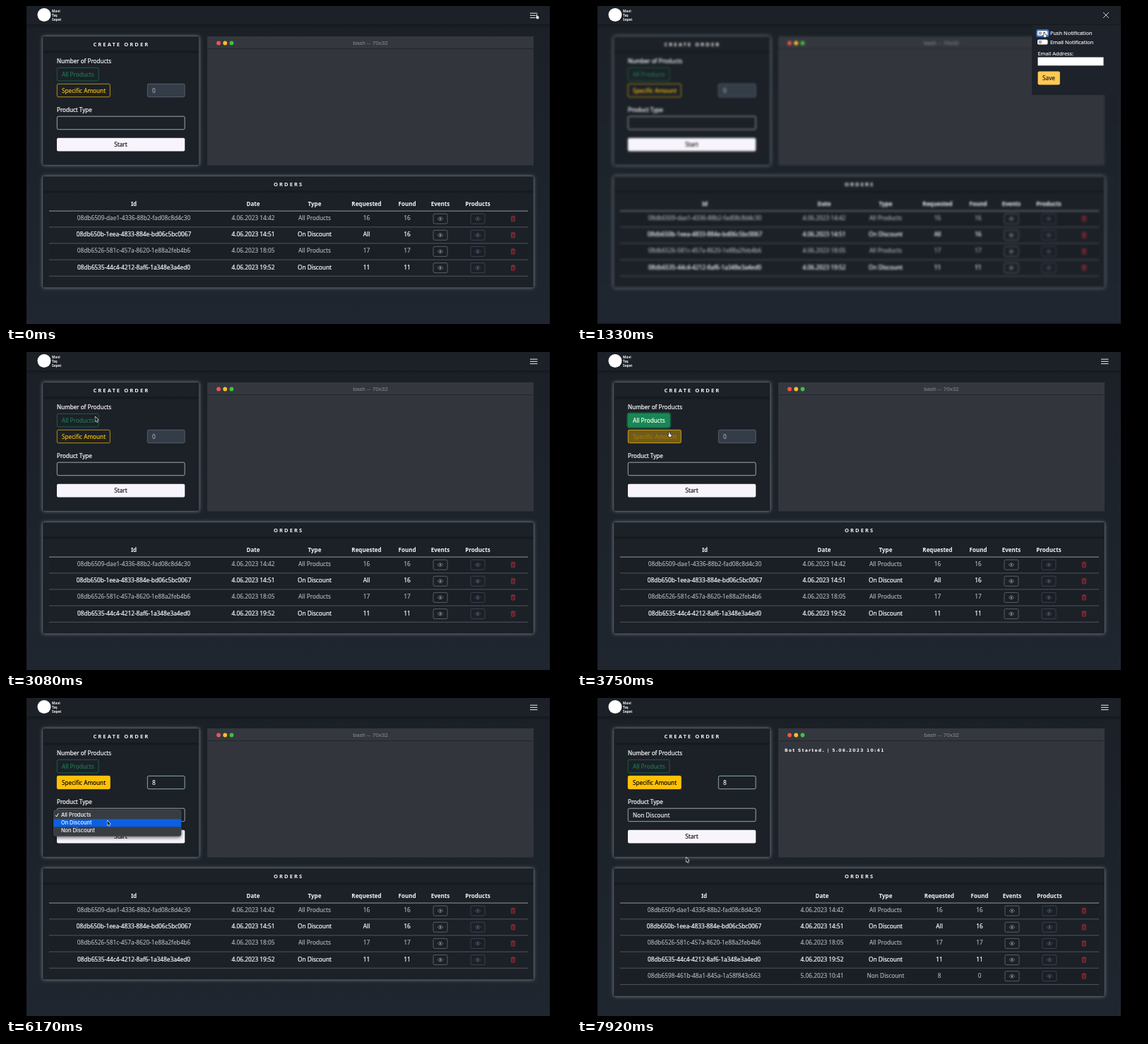
Animation, 800 px wide and 450 px high, one loop 8000 ms. Source, as an HTML page with a canvas:

```html
<!DOCTYPE html>
<html lang="en">
<head>
<meta charset="utf-8">
<title>Order dashboard</title>
<style>
html, body { margin: 0; width: 100%; height: 100%; overflow: hidden; background: #000; }
canvas { display: block; width: 800px; height: 450px; }
</style>
</head>
<body>
<canvas id="stage" width="800" height="450"></canvas>
<script>
const LOOP = 8000;
const screen2d = document.getElementById('stage').getContext('2d');
const buffer = document.createElement('canvas');
buffer.width = 800;
buffer.height = 450;
const page2d = buffer.getContext('2d');
let c = page2d;

const SANS = '"Noto Sans", sans-serif';
const SYSTEM = 'Inter, sans-serif';
const AMBER = '#ffc107', GREEN = '#198754', WHITE = '#f4f4f6';

// Moments of the interaction, in ms
const OPEN = 330, PUSH_FOCUS = 1270, PUSH_ON = 1400, SAVE = 1980, CLOSE = 2470;
const ALL_HOVER = 3120, ALL_CLICK = 3300, SPEC_HOVER = 3690, SPEC_CLICK = 3850;
const INPUT_FOCUS = 4350, SELECT_DIGIT = 4750, TYPE = 5330, LEAVE_INPUT = 5500;
const LIST_OPEN = 5950, LIST_CLOSE = 6800, ORDERED = 7720;

const PATH = [
  [0, 752, 15], [560, 752, 15], [1230, 662, 41], [1500, 662, 41],
  [1850, 668, 104], [2080, 668, 104], [2380, 752, 19], [2540, 752, 19],
  [3150, 105, 98], [3430, 105, 98], [3720, 131, 117], [3900, 131, 117],
  [4350, 214, 120], [4600, 214, 120], [4960, 177, 122], [5420, 177, 122],
  [5840, 150, 166], [6000, 148, 168], [6140, 145, 177], [6280, 145, 177],
  [6480, 143, 188], [6860, 143, 188], [7200, 158, 198], [7620, 158, 198],
  [7860, 156, 229]
];

const clamp = v => Math.max(0, Math.min(1, v));
const ease = v => v * v * (3 - 2 * v);
const fade = (t, from, ms = 150) => ease(clamp((t - from) / ms));
const within = (t, a, b) => t >= a && t < b;

function cursorAt(t) {
  const i = PATH.findIndex(p => p[0] > t);
  if (i < 0) return PATH[PATH.length - 1].slice(1);
  const [t0, x0, y0] = PATH[i - 1], [t1, x1, y1] = PATH[i];
  const k = ease((t - t0) / (t1 - t0));
  return [x0 + (x1 - x0) * k, y0 + (y1 - y0) * k];
}

function text(s, x, y, { size = 8.2, color = WHITE, weight = 500, align = 'left', family = SANS, gap = 0, bold = 0 } = {}) {
  c.font = `${weight} ${size}px ${family}`;
  c.letterSpacing = gap + 'px';
  c.textAlign = align;
  c.textBaseline = 'alphabetic';
  c.fillStyle = color;
  c.fillText(s, x, y + size * 0.36);
  if (bold) {
    c.lineJoin = 'round';
    c.lineWidth = bold;
    c.strokeStyle = color;
    c.strokeText(s, x, y + size * 0.36);
  }
}

function box(x, y, w, h, { fill, stroke, r = 2, line = 0.8 } = {}) {
  c.beginPath();
  c.roundRect(x, y, w, h, r);
  if (fill) { c.fillStyle = fill; c.fill(); }
  if (stroke) { c.strokeStyle = stroke; c.lineWidth = line; c.stroke(); }
}

function stroke(points, color, width = 1) {
  c.beginPath();
  points.forEach(([x, y]) => c.lineTo(x, y));
  c.strokeStyle = color;
  c.lineWidth = width;
  c.stroke();
}

function dot(x, y, r, color) {
  c.beginPath();
  c.arc(x, y, r, 0, Math.PI * 2);
  c.fillStyle = color;
  c.fill();
}

function card(x, y, w, h, title) {
  c.save();
  c.shadowColor = 'rgba(170,178,184,.75)';
  c.shadowBlur = 5;
  box(x, y, w, h, { fill: '#1c2128' });
  c.restore();
  box(x, y, w, h, { stroke: 'rgba(120,126,132,.3)', line: 0.6 });
  const g = c.createLinearGradient(0, y + 19, 0, y + 25);
  g.addColorStop(0, 'rgba(8,11,15,0)');
  g.addColorStop(0.45, 'rgba(8,11,15,.4)');
  g.addColorStop(1, 'rgba(8,11,15,0)');
  c.fillStyle = g;
  c.fillRect(x + 1, y + 19, w - 2, 6);
  text(title, x + w / 2 + 0.6, y + 10.9, { size: 7.5, weight: 600, align: 'center', gap: 2.1 });
}

function drawForm(t) {
  card(52, 43, 221.5, 182, 'CREATE ORDER');
  text('Number of Products', 72, 78, { size: 8.1, bold: 0.22 });

  const allOn = t < SPEC_CLICK ? fade(t, ALL_HOVER) : 1 - fade(t, SPEC_CLICK);
  if (within(t, ALL_CLICK, SPEC_CLICK)) box(71.5, 86.5, 60.5, 20.5, { stroke: 'rgba(25,135,84,.5)', line: 2.5, r: 3 });
  box(72.3, 87.4, 58.8, 18.5, { stroke: '#1b6d49' });
  c.globalAlpha = allOn;
  box(72, 87, 59.5, 19.5, { fill: GREEN });
  c.globalAlpha = 1;
  text('All Products', 79, 97.2, { color: allOn > 0.5 ? '#fff' : '#1d7a50', bold: 0.15 });

  const specOn = fade(t, SPEC_HOVER);
  box(72.3, 110.3, 75, 18.4, { stroke: '#dfaa0c' });
  c.globalAlpha = specOn;
  box(72, 110, 75.5, 19, { fill: AMBER });
  c.globalAlpha = 1;
  const k = 1 - specOn;
  text('Specific Amount', 79, 119.8, { color: `rgb(${255 * k},${193 * k},${7 * k})`, bold: 0.15 });

  drawAmount(t);
  text('Product Type', 72, 147, { size: 8.1, bold: 0.22 });
  box(72.3, 156.2, 180.8, 18.5, { stroke: '#c4c7ca' });
  if (t >= LIST_CLOSE) text('Non Discount', 79, 166, { bold: 0.15 });
  box(72, 186.7, 181.2, 18.8, { fill: '#f8f4fb' });
  text('Start', 162.5, 196.5, { color: '#15171b', align: 'center', bold: 0.2 });
  if (within(t, LIST_OPEN, LIST_CLOSE)) drawList(t);
}

function drawAmount(t) {
  const enabled = t >= SPEC_CLICK;
  const border = !enabled ? '#616a76' : t < TYPE ? '#c4c7ca' : '#add3b4';
  box(200.3, 110.3, 52.8, 18.4, { fill: enabled ? '#1c2128' : '#343c48', stroke: border });
  if (within(t, SELECT_DIGIT, TYPE)) {
    c.fillStyle = '#587cae';
    c.fillRect(206.5, 114, 5.5, 11.5);
  }
  text(t < TYPE ? '0' : '8', 207, 119.7, { color: enabled ? WHITE : '#a0a6ad', bold: 0.15 });
  if (within(t, INPUT_FOCUS, LEAVE_INPUT)) {
    box(239, 113.5, 8, 12, { fill: '#f1f1f1', r: 1 });
    c.fillStyle = '#444';
    for (const s of [-1, 1]) {
      c.beginPath();
      c.moveTo(241.2, 119.5 + s * 2);
      c.lineTo(244.8, 119.5 + s * 2);
      c.lineTo(243, 119.5 + s * 4.2);
      c.fill();
    }
  }
}

function drawList(t) {
  const active = t < 6080 ? 0 : t < 6380 ? 1 : 2;
  c.save();
  c.shadowColor = 'rgba(0,0,0,.6)';
  c.shadowBlur = 5;
  c.shadowOffsetY = 2;
  box(67.5, 158.5, 180.5, 37, { fill: '#393c41', r: 3 });
  c.restore();
  box(67.5, 158.5, 180.5, 37, { stroke: '#55585c', r: 3, line: 0.6 });
  c.fillStyle = '#0b5fe2';
  c.fillRect(67.5, 160.5 + active * 10.9, 180.5, 10.9);
  ['All Products', 'On Discount', 'Non Discount'].forEach((s, i) =>
    text(s, 78, 165.4 + i * 10.9, { size: 7.4, color: '#fff', family: SYSTEM }));
  stroke([[70, 166], [71.6, 168], [74.3, 163.3]], '#fff', 1);
}

function drawTerminal(t) {
  c.fillStyle = '#32353c';
  c.fillRect(285, 43, 462, 182.5);
  c.fillStyle = '#34383e';
  c.fillRect(285, 43, 462, 17);
  c.fillStyle = '#23272d';
  c.fillRect(285, 60, 462, 1);
  ['#f4544d', '#fbbd2e', '#3fc13f'].forEach((color, i) => dot(301 + i * 9.2, 52.5, 2.9, color));
  text('bash -- 70x32', 516, 51.9, { size: 8.1, weight: 400, color: '#8b8e92', align: 'center', family: '"Liberation Sans", sans-serif' });
  if (t >= ORDERED) text('Bot Started. | 5.06.2023 10:41', 294, 73.6, { size: 6, weight: 700, gap: 1.3, family: '"DejaVu Sans", sans-serif' });
}

function eyeButton(x, y, color, border) {
  box(x - 10, y - 7, 20, 14, { stroke: border });
  c.beginPath();
  c.moveTo(x - 3.7, y);
  c.quadraticCurveTo(x, y - 5, x + 3.7, y);
  c.quadraticCurveTo(x, y + 5, x - 3.7, y);
  c.strokeStyle = color;
  c.lineWidth = 0.7;
  c.stroke();
  dot(x, y, 1.2, color);
}

function trash(x, y) {
  const red = '#a22a36';
  stroke([[x - 3.3, y - 3], [x + 3.3, y - 3]], red, 0.9);
  stroke([[x - 1.2, y - 3.9], [x + 1.2, y - 3.9]], red, 0.8);
  box(x - 2.5, y - 2.5, 5, 6.2, { fill: 'rgba(162,42,54,.4)', stroke: red, r: 0.8 });
}

const ORDERS = [
  ['08db6509-dae1-4336-88b2-fad08c8d4c30', '4.06.2023 14:42', 'All Products', '16', '16'],
  ['08db650b-1eea-4833-884e-bd06c5bc0067', '4.06.2023 14:51', 'On Discount', 'All', '16'],
  ['08db6526-581c-457a-8620-1e88a2feb4b6', '4.06.2023 18:05', 'All Products', '17', '17'],
  ['08db6535-44c4-4212-8af6-1a348e3a4ed0', '4.06.2023 19:52', 'On Discount', '11', '11'],
  ['08db6598-461b-48a1-845a-1a58f843c663', '5.06.2023 10:41', 'Non Discount', '8', '0']
];
const HEADS = ['Id', 'Date', 'Type', 'Requested', 'Found', 'Events', 'Products'];

function drawOrders(t) {
  const more = t >= ORDERED;
  const cols = more ? [180, 347, 437, 513, 570, 616, 669] : [181, 350, 437, 510.5, 568, 615, 668];
  card(52, 241, 695, more ? 181 : 157.5, 'ORDERS');
  HEADS.forEach((s, i) => text(s, cols[i], 280.2, { weight: 600, size: 8, align: 'center' }));
  stroke([[61, 290.1], [739, 290.1]], '#a6a9ad', 0.9);
  ORDERS.slice(0, more ? 5 : 4).forEach((row, r) => {
    const y = 300 + r * 23.15;
    const dim = r % 2 === 0;
    if (dim) {
      c.fillStyle = 'rgba(0,0,0,.06)';
      c.fillRect(61, y - 10, 678, 23);
    }
    row.forEach((s, i) => text(s, cols[i], y + 0.2, {
      size: 8.27, align: 'center', color: dim ? '#b4b7bb' : WHITE, bold: dim ? 0.12 : 0.22
    }));
    eyeButton(cols[5], y + 1.1, '#92979e', '#686e76');
    eyeButton(cols[6], y + 1.1, '#566575', '#404b58');
    trash(718, y + 1.1);
    stroke([[61, y + 12.8], [739, y + 12.8]], '#5f646b', 0.8);
  });
}

function drawPage(t) {
  const g = c.createLinearGradient(0, 0, 0, 450);
  g.addColorStop(0, '#1b2027');
  g.addColorStop(1, '#1f262f');
  c.fillStyle = g;
  c.fillRect(0, 0, 800, 450);
  drawForm(t);
  drawTerminal(t);
  drawOrders(t);
}

function drawNav(open) {
  c.fillStyle = '#1c2128';
  c.fillRect(29, 0, 741, 27);
  const g = c.createLinearGradient(0, 26, 0, 32);
  g.addColorStop(0, 'rgba(6,9,13,.35)');
  g.addColorStop(1, 'rgba(6,9,13,0)');
  c.fillStyle = g;
  c.fillRect(29, 26, 741, 6);
  dot(54, 12.5, 9.5, '#fff');
  ['Mavi', 'Taş', 'Sepet'].forEach((s, i) => text(s, 65, 7 + i * 6.1, { size: 4.8, weight: 700 }));
  if (open) {
    stroke([[745, 9], [753, 17]], '#c9ccd0', 1);
    stroke([[753, 9], [745, 17]], '#c9ccd0', 1);
  } else {
    for (const y of [10.2, 13.4, 16.6]) stroke([[742, y], [752.5, y]], '#e8e8e8', 1);
  }
}

function toggle(y, on) {
  box(652, y - 3.5, 14.5, 7, { fill: on > 0.5 ? '#ffc44f' : '#fff', r: 1.8 });
  c.globalAlpha = 1 - on;
  dot(655.8 + on * 7, y, 2.5, '#a9a9ad');
  c.globalAlpha = 1;
}

function drawSettings(t) {
  c.fillStyle = '#1e222a';
  c.fillRect(644, 27, 126, 99);
  if (within(t, PUSH_FOCUS, SAVE)) box(651, 33.7, 16.5, 9.6, { stroke: '#3f86e8', line: 1.5, r: 2.5 });
  toggle(38.5, fade(t, PUSH_ON, 120));
  toggle(51, 0);
  text('Push Notification', 670, 38.4, { size: 7.4, bold: 0.15 });
  text('Email Notification', 670, 51.1, { size: 7.4, bold: 0.15 });
  text('Email Address:', 652.5, 67.1, { size: 7.35, bold: 0.15 });
  c.fillStyle = '#fff';
  c.fillRect(652.5, 72.5, 93, 11.8);
  if (t >= SAVE) box(651.7, 91.7, 33, 20.6, { stroke: '#3f86e8', line: 1.8, r: 3 });
  box(652.5, 92.5, 31.3, 19, { fill: '#ffc953' });
  text('Save', 668, 102, { color: '#15171b', align: 'center', bold: 0.15 });
}

function polygon(points, fill, edge) {
  c.beginPath();
  points.forEach(([x, y]) => c.lineTo(x, y));
  c.closePath();
  c.lineJoin = 'round';
  c.strokeStyle = edge;
  c.lineWidth = 1.2;
  c.stroke();
  c.fillStyle = fill;
  c.fill();
}

function drawCursor(t) {
  const [x, y] = cursorAt(t);
  const hand = t < 2540 || within(t, ALL_HOVER, 3950) || within(t, 7120, 7680);
  c.save();
  c.translate(x, y);
  if (hand) polygon([[-1, -3.6], [0.1, -3.6], [0.4, -1], [2.7, 0], [2.3, 3.3], [-0.6, 3.3], [-2.3, 0.6], [-1, 0.6]], '#f2f2f2', '#111');
  else polygon([[-1.5, -3.5], [-1.5, 3], [0, 1.7], [1.1, 4], [2, 3.5], [1, 1.4], [2.8, 1.2]], '#111', '#f2f2f2');
  c.restore();
}

function render(t) {
  c = page2d;
  drawPage(t);

  c = screen2d;
  c.fillStyle = '#000';
  c.fillRect(0, 0, 800, 450);
  c.save();
  c.beginPath();
  c.rect(29, 0, 741, 450);
  c.clip();
  const shown = t < CLOSE ? fade(t, OPEN, 200) : 1 - fade(t, CLOSE, 160);
  if (shown > 0) c.filter = `blur(${(shown * 1.45).toFixed(2)}px)`;
  c.drawImage(buffer, 0, 0);
  c.filter = 'none';
  drawNav(within(t, OPEN, CLOSE));
  if (shown > 0.5) drawSettings(t);
  c.restore();
  drawCursor(t);
}

const start = performance.now();
function tick() {
  render((performance.now() - start) % LOOP);
  requestAnimationFrame(tick);
}
tick();
</script>
</body>
</html>
```
